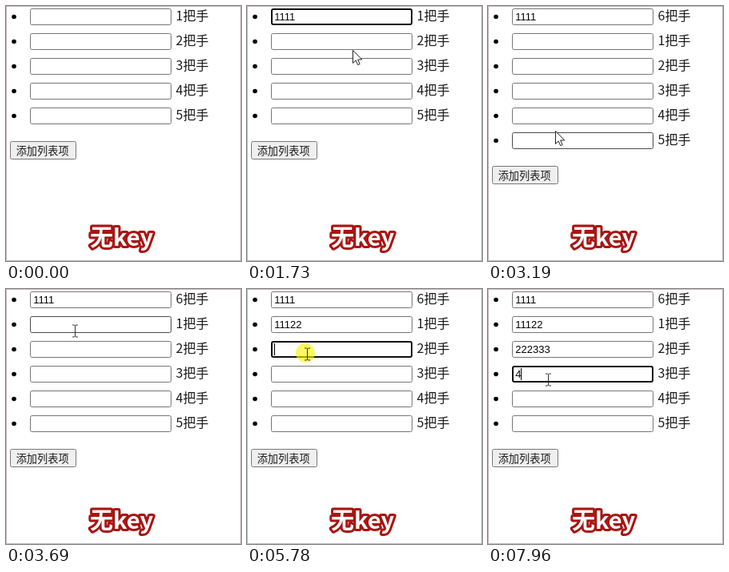
An HTML page for the animation above (7990 ms loop, 294 px wide and 319 px high).

```html
<!DOCTYPE html>
<html lang="zh">
<head>
<meta charset="utf-8">
<title>无key</title>
<style>
  html, body { margin: 0; width: 100%; height: 100%; overflow: hidden; background: #fff; }
  svg { display: block; width: 294px; height: 319px; }
  text { white-space: pre; fill: #000; }
  .label { font: 350 16px "Noto Sans CJK SC", "Noto Sans CJK", sans-serif; fill: #1a1a1a; }
  .value { font: 13px "Liberation Sans", Arial, sans-serif; }
  .caption { font: 350 13.2px "Noto Sans CJK SC", "Noto Sans CJK", sans-serif; fill: #1a1a1a; }
  .title {
    font: 700 29px "Noto Sans CJK SC", "Noto Sans CJK", sans-serif;
    fill: #fff; stroke: #a81512; stroke-width: 6; stroke-linejoin: round; paint-order: stroke;
  }
  .field { fill: #fff; stroke: #767676; }
  .field.hover { stroke: #4a4a4a; }
  .field.focus { stroke: #101010; stroke-width: 2; }
  .button { fill: #efefef; stroke: #767676; }
  .button.hover { fill: #e5e5e5; stroke: #4f4f4f; }
</style>
</head>
<body>
<svg viewBox="0 0 294 319">
  <g id="rows"></g>
  <g id="button">
    <rect class="button" x="5.5" y="169.5" width="82" height="22" rx="2"/>
    <text class="caption" x="12.7" y="185.5">添加列表项</text>
  </g>
  <text class="title" x="105" y="300">无key</text>
  <rect x="0.5" y="0.5" width="293" height="318" fill="none" stroke="#c6b6b7"/>
  <circle id="click" cx="-2" cy="-1" r="12" fill="#f8f400" fill-opacity="0.62"/>
  <g id="pointer">
    <path id="arrow" d="M-.5 .5V16.5L3.2 13L5.7 18.7L8.2 17.6L5.7 12H10.8Z" fill="#fff" stroke="#222"/>
    <path id="beam" d="M-3.5 -7.5H-1L0 -6.5L1 -7.5H3.5M0 -6.5V6.5M-3.5 7.5H-1L0 6.5L1 7.5H3.5"
          transform="translate(.5 .5)" fill="none" stroke="#333"/>
  </g>
</svg>
<script>
const LOOP = 7990, ENTER = 20, ADDED = 2950;
const PITCH = 31, FIELD_TOP = 3, FIELD_HEIGHT = 21, FIELD_LEFT = 30, FIELD_WIDTH = 177;
const BLINK = 500, PRESS = 190, KEY_GAP = 70;

// Each glide eases from wherever the pointer rests to a new place.
const entry = { x: 252, y: 281 };
const glides = [
  { start: 20, end: 370, x: 148, y: 12 },
  { start: 970, end: 1730, x: 133, y: 55 },
  { start: 1920, end: 2620, x: 60, y: 180 },
  { start: 2960, end: 3190, x: 85, y: 156 },
  { start: 3190, end: 3780, x: 86, y: 45 },
  { start: 4150, end: 4370, x: 91, y: 56 },
  { start: 4520, end: 5450, x: 75, y: 81 },
  { start: 6700, end: 7350, x: 75, y: 106 },
  { start: 7890, end: 7950, x: 75, y: 113 }
];

// A click without a row is on the button.
const visits = [
  { click: 520, row: 0, bursts: [["1111", 1000]] },
  { click: 2900 },
  { click: 3820, row: 1, bursts: [["1", 4300], ["11", 4520], ["22", 5280]] },
  { click: 5780, row: 2, bursts: [["222", 6080], ["333", 6710]] },
  { click: 7530, row: 3, bursts: [["4", 7910]] }
];

const $ = id => document.getElementById(id);
const show = (node, on) => node.setAttribute("visibility", on ? "visible" : "hidden");
const move = (node, x, y) => node.setAttribute("transform", `translate(${x} ${y})`);
const ease = k => k * k * (3 - 2 * k);

function set(node, attrs) {
  for (const key in attrs) node.setAttribute(key, attrs[key]);
  return node;
}

function add(parent, tag, attrs = {}) {
  const node = document.createElementNS("http://www.w3.org/2000/svg", tag);
  return set(parent.appendChild(node), attrs);
}

const rows = Array.from({ length: 6 }, (_, i) => {
  const group = add($("rows"), "g");
  move(group, 0, i * PITCH);
  add(group, "circle", { cx: 10, cy: 13.5, r: 2.8 });
  return {
    group,
    field: add(group, "rect"),
    value: add(group, "text", { class: "value", x: 34.3, y: 18 }),
    caret: add(group, "rect", { y: 6, width: 1, height: 15 }),
    label: add(group, "text", { class: "label", x: 212.6, y: 18 })
  };
});

function pointerAt(t) {
  let { x, y } = entry;
  for (const glide of glides) {
    if (t < glide.start) break;
    const k = ease(Math.min(1, (t - glide.start) / (glide.end - glide.start)));
    x += (glide.x - x) * k;
    y += (glide.y - y) * k;
  }
  return { x, y };
}

function typedKeys(row, t) {
  const visit = visits.find(v => v.row === row);
  if (!visit) return [];
  return visit.bursts
    .flatMap(([text, start]) => [...text].map((char, i) => ({ char, time: start + i * KEY_GAP })))
    .filter(key => key.time <= t);
}

function drawRow(row, i, t, active, y) {
  const added = t >= ADDED;
  const keys = typedKeys(i, t);
  const focused = Boolean(active) && active.row === i;
  const top = FIELD_TOP + i * PITCH;
  const hover = t >= ENTER && y >= top - 3 && y < top + FIELD_HEIGHT;

  show(row.group, i < 5 || added);
  row.label.textContent = (added ? i || 6 : i + 1) + "把手";
  row.value.textContent = keys.map(key => key.char).join("");

  const inset = focused ? 1 : 0.5;
  set(row.field, {
    class: focused ? "field focus" : hover ? "field hover" : "field",
    x: FIELD_LEFT + inset, y: FIELD_TOP + inset, rx: 2,
    width: FIELD_WIDTH - 2 * inset, height: FIELD_HEIGHT - 2 * inset
  });

  const idle = focused ? t - Math.max(active.click, ...keys.map(key => key.time)) : 0;
  const lit = focused && Math.floor(idle / BLINK) % 2 === 0;
  set(row.caret, {
    x: 34 + Math.round(row.value.getComputedTextLength()),
    display: lit ? "inline" : "none"
  });
}

function draw(t) {
  const { x, y } = pointerAt(t);
  const active = visits.filter(v => v.click <= t).pop();
  const count = t >= ADDED ? 6 : 5;
  const present = t >= ENTER;
  rows.forEach((row, i) => drawRow(row, i, t, active, y));

  const shift = (count - 5) * PITCH;
  move($("button"), 0, shift);
  const onButton = present && x < 88 && y >= 169 + shift && y < 192 + shift;
  $("button").firstElementChild.setAttribute("class", onButton ? "button hover" : "button");

  const index = Math.floor((y - FIELD_TOP) / PITCH);
  const inField = index < count && (y - FIELD_TOP) % PITCH < FIELD_HEIGHT
    && x >= FIELD_LEFT && x < FIELD_LEFT + FIELD_WIDTH;
  show($("arrow"), present && !inField);
  show($("beam"), present && inField);
  move($("pointer"), Math.round(x), Math.round(y));

  show($("click"), active && t - active.click < PRESS);
  move($("click"), Math.round(x), Math.round(y));
}

const start = performance.now();
function tick() {
  draw((performance.now() - start) % LOOP);
  requestAnimationFrame(tick);
}
tick();
</script>
</body>
</html>
```
